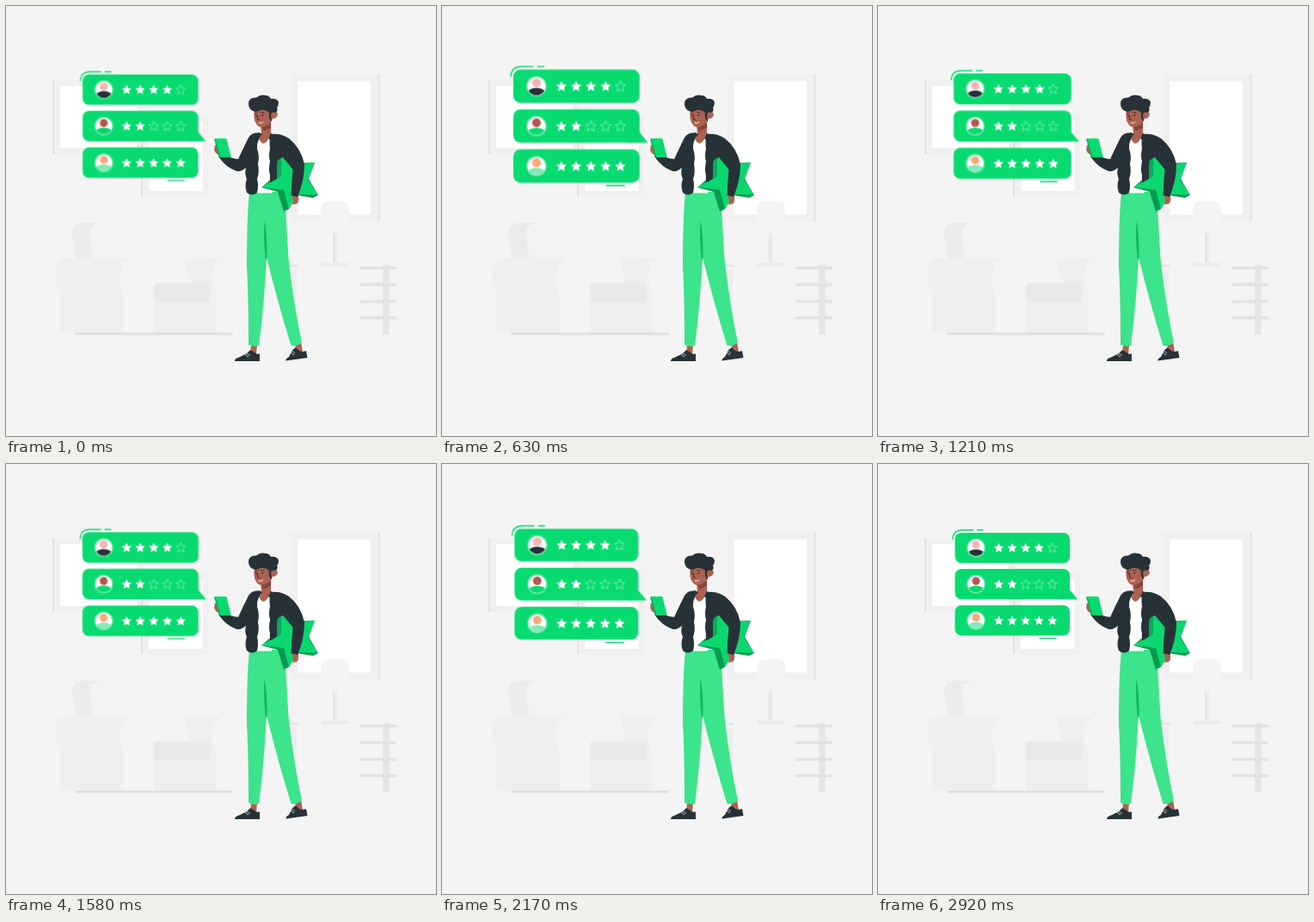
Animation of 500 by 500 pixels, one loop 3000 ms. Source, as an HTML page without scripts:

```html
<!DOCTYPE html>
<html lang="en">
<head>
<meta charset="utf-8">
<title>Customer ratings</title>
<style>
html, body { margin: 0; width: 100%; height: 100%; overflow: hidden; background: #f4f4f4; }
svg { display: block; width: 100vw; height: 100vh; }
.reviews { transform-origin: 156.3px 139.6px; animation: pulse 3s linear infinite; }
@keyframes pulse {
  0% { transform: scale(1.006); }
  6% { transform: scale(1.036); }
  12.67% { transform: scale(1.077); animation-timing-function: ease-out; }
  19% { transform: scale(1.1); animation-timing-function: ease-in; }
  29.33% { transform: scale(1.077); }
  36% { transform: scale(1.042); }
  43% { transform: scale(1.013); animation-timing-function: ease-out; }
  49% { transform: scale(1); animation-timing-function: ease-in; }
  52.67% { transform: scale(1.01); }
  72.33% { transform: scale(1.077); animation-timing-function: ease-out; }
  75.67% { transform: scale(1.1); animation-timing-function: ease-in; }
  83.33% { transform: scale(1.066); }
  90.33% { transform: scale(1.03); animation-timing-function: ease-out; }
  97.33% { transform: scale(1); }
  100% { transform: scale(1.006); }
}
.green { fill: #07db70; }
.dark { fill: #263238; }
.skin { fill: #ad6150; }
.line { fill: none; stroke: #07db70; stroke-width: 1.4; stroke-linecap: round; }
.full { fill: #fff; }
.empty { fill: none; stroke: #fff; stroke-width: .6; opacity: .7; }
</style>
</head>
<body>
<svg viewBox="0 0 500 500">
  <defs>
    <path id="star" d="M0-5.6 1.7-2 5.5-1.6 2.7 1.1 3.4 5 0 3.1-3.4 5-2.7 1.1-5.5-1.6-1.7-2Z"/>
    <clipPath id="face"><circle r="9.6"/></clipPath>
    <g id="badge"><circle r="11" fill="#fff" opacity=".35"/><circle r="9.6" fill="#fff"/></g>
    <rect id="card" width="133.6" height="35.2" rx="7.5" class="green"/>
  </defs>

  <!-- wall -->
  <path d="M37 65V335M250.500 65V300" stroke="#f1f1f1" stroke-width="2"/>
  <g>
    <path d="M54 86H160V172H54Z" fill="#f0f0f0"/>
    <path d="M54 86H56V172H54Z" fill="#e1e1e1"/>
    <path d="M63 93H152V165H63Z" fill="#fff"/>
    <path d="M157 126H235V221H157Z" fill="#f0f0f0"/>
    <path d="M157 126H159V221H157Z" fill="#e1e1e1"/>
    <path d="M166 134H228.500V215H166Z" fill="#fff"/>
    <path d="M331 79H434V250.500H331Z" fill="#f0f0f0"/>
    <path d="M432.500 79H435V250.500H432.500Z" fill="#e4e4e4"/>
    <path d="M339.500 87.500H424V242.500H339.500Z" fill="#fff"/>
  </g>

  <!-- lamp and shelf -->
  <path d="M365 264 367 234Q368 227 375 227H391Q398 227 399 234L401 264Z" fill="#f4f4f4"/>
  <path d="M380 264H384.500V299H380Z" fill="#e4e4e4"/>
  <path d="M382.500 264H384.500V299H382.500Z" fill="#ececec"/>
  <rect x="366.500" y="298.500" width="31.500" height="4.500" rx="1.500" fill="#ebebeb"/>
  <path d="M329 302H338V304M329 323H338M329 342H338" stroke="#e6e6e6" stroke-width="2.500" fill="none"/>
  <path d="M331 307H338V340H331Z" fill="#ededed"/>
  <path d="M438 301H446V382H438Z" fill="#e6e6e6"/>
  <path d="M411 304.500H454M411 324H454M411 343.500H454M411 362.500H454" stroke="#e2e2e2" stroke-width="3.500"/>

  <!-- sofa -->
  <path d="M84 294 77 267Q76 252 90 252H205Q222 253 226 268L230 294Z" fill="#f3f3f3"/>
  <path d="M82 294 77 268Q75 252 90 252H111Q97 254 97 267L102 294Z" fill="#ebebeb"/>
  <path d="M63 380V333Q57 323 58 307Q60 293 72 293H160V380Z" fill="#efefef"/>
  <path d="M137 380V337Q131 320 134 306Q138 293 150 293H210L219 322V380Z" fill="#f4f4f4"/>
  <path d="M208 293H262L245 380H172V342L212 322Z" fill="#efefef"/>
  <path d="M176 322H234Q237 322 237 326V344H172V327Q172 322 176 322Z" fill="#e9e9e9"/>
  <path d="M245 378V337Q238 322 241 306Q245 293 257 293H283V378Z" fill="#f4f4f4"/>
  <rect x="80" y="379.800" width="184" height="2.600" rx="1.300" fill="#dedede"/>

  <!-- reviews -->
  <g class="reviews">
    <path class="line" d="M86.800 87Q87.500 77 98 76.700H110.500M115.500 76.700H122M188 202.600H207"/>
    <use href="#card" x="89.500" y="79.900"/>
    <use href="#card" x="89.500" y="122"/>
    <use href="#card" x="89.500" y="164.300"/>
    <path class="green" d="M222 145 232 157.200H212Z"/>
    <g transform="translate(114 97.400)">
      <use href="#badge"/>
      <g clip-path="url(#face)"><circle cy="-3.500" r="4.600" fill="#f7b5b0"/><ellipse cy="7.800" rx="10" ry="6" class="dark"/></g>
    </g>
    <g transform="translate(114 139.600)">
      <use href="#badge"/>
      <g clip-path="url(#face)"><circle cy="-3.500" r="4.600" fill="#b4574b"/><ellipse cy="7.800" rx="10" ry="6" class="green"/></g>
    </g>
    <g transform="translate(114 182)">
      <use href="#badge"/>
      <g clip-path="url(#face)"><circle cy="-3.500" r="4.600" fill="#fba877"/><ellipse cy="7.800" rx="10" ry="6" fill="#84eab7"/></g>
    </g>
    <g class="full">
      <use href="#star" x="140.400" y="97.600"/><use href="#star" x="156" y="97.600"/><use href="#star" x="171.600" y="97.600"/><use href="#star" x="187.200" y="97.600"/>
      <use href="#star" x="140.400" y="139.800"/><use href="#star" x="156" y="139.800"/>
      <use href="#star" x="140.400" y="182.200"/><use href="#star" x="156" y="182.200"/><use href="#star" x="171.600" y="182.200"/><use href="#star" x="187.200" y="182.200"/><use href="#star" x="202.800" y="182.200"/>
    </g>
    <g class="empty">
      <use href="#star" x="202.800" y="97.600"/>
      <use href="#star" x="171.600" y="139.800"/><use href="#star" x="187.200" y="139.800"/><use href="#star" x="202.800" y="139.800"/>
    </g>
  </g>

  <!-- legs -->
  <path class="skin" d="M285 394H292L291 405H284ZM336 393 343 391 345 402 338 404Z"/>
  <path class="dark" d="M266 412.800Q266 410 271 408.500L280 404 284 400Q288 402 291 404.500H295V413H266ZM325.500 412.500Q325 410 329 408L333 400 337 397Q341 402 345 402L349 401 350.500 409Z"/>
  <path d="M278 405.500 282 408M279.500 403.500 284 406.500M331 403 335 406M332 400.500 336 404" stroke="#fff" stroke-width=".7"/>
  <path d="M283 216H323Q325 226 326 252L328.500 294Q335 350 344 391Q340 396 331.500 395Q316 345 303 292Q300 350 294 395Q288 397 282 394Q282 340 280 302Q280 245 283 216Z" fill="#3ce48b"/>
  <path d="M300.500 249Q304 268 303.500 293L302 296Q299 272 300.500 249Z" fill="#12b565"/>

  <!-- shirt and big star -->
  <path d="M292 153H309V217.500H292Z" fill="#fff"/>
  <path d="M314 178 320 175 334 183 359 182 352 201 363 220 357 223 338 220 329 236 323 239 316 216 297 211 314 196Z" fill="#079a50"/>
  <path d="M320 175 334 185.500 359 182 351 202 363 219.500 339 219 329 236 323 214 297 210.500 320 198Z" fill="#0bd76f"/>
  <path d="M314 178 320 175V198L314 201Z" fill="#0aa95a"/>

  <!-- jacket -->
  <path class="skin" d="M332 219 340 221Q341 228 338 230L333 231 334 226Z"/>
  <path class="dark" d="M308 149Q320 148 329 154Q343 165 347 184Q347 203 339 222L331.500 220Q332 204 333.500 190L322 176 318 178Q315 179 315 185V199L307 205Z"/>
  <path class="dark" d="M311 149Q305 150 307 166Q305 174 307 181Q305 190 307 197Q306 201 308 205L315 201V177Q322 172 326 178L320 150Z"/>
  <path class="dark" d="M296 148Q287 146 282 153Q276 165 270 178Q260 177 250 171L247 175Q256 188 268 192Q274 193 279 188Q277 195 280 201Q277 209 280 217Q286 222 292 217Q294 209 292 201Q295 193 293 184Q295 174 292 166Q291 156 298 151Z"/>
  <path class="skin" d="M296 137 308 134 308 149Q304 159 299 160Q294 157 294 152L297 149Z"/>
  <path class="dark" d="M289 151 294 147 298 149 293 155ZM308 148 313 150 310 158 305 154Z"/>

  <!-- hand and phone -->
  <path class="skin" d="M243 162Q241 168 244 171L251 176 254 169 247 160Z"/>
  <path d="M242 154.500 256 154 261.500 175.500 248 176Z" fill="#09ab5b"/>
  <path class="green" d="M243.500 154.300 256 154 261.500 175.500 249.500 176Z"/>

  <!-- head -->
  <path class="skin" d="M289 118Q287 132 291 137Q295 143 302 140Q308 137 310 131Q315 131 316 126Q315 122 311 123L308 116Z"/>
  <path d="M297 141Q304 140 308 135V141Q303 145 299 145Z" fill="#86463b"/>
  <path class="dark" d="M290 123Q282 121 282 114Q282 106 291 106.500Q296 102 302 104Q306 104 308 108Q315 107 317 112Q317 116 315 118Q317 122 313 124Q309 122 308 127L309 134Q305 132 306 124Q301 120 296 121Q293 123 290 123Z"/>
  <g fill="none" stroke="#263238" stroke-linecap="round" stroke-width=".9">
    <path d="M289.500 125.500 291.500 124.500M296.500 123.500 300 124.200M292.500 127V132L294.500 132"/>
    <path d="M294 136Q297 137 299 135" stroke="#fff"/>
  </g>
  <circle class="dark" cx="291" cy="127.500" r=".9"/><circle class="dark" cx="298.300" cy="127" r=".9"/>
</svg>
</body>
</html>
```
